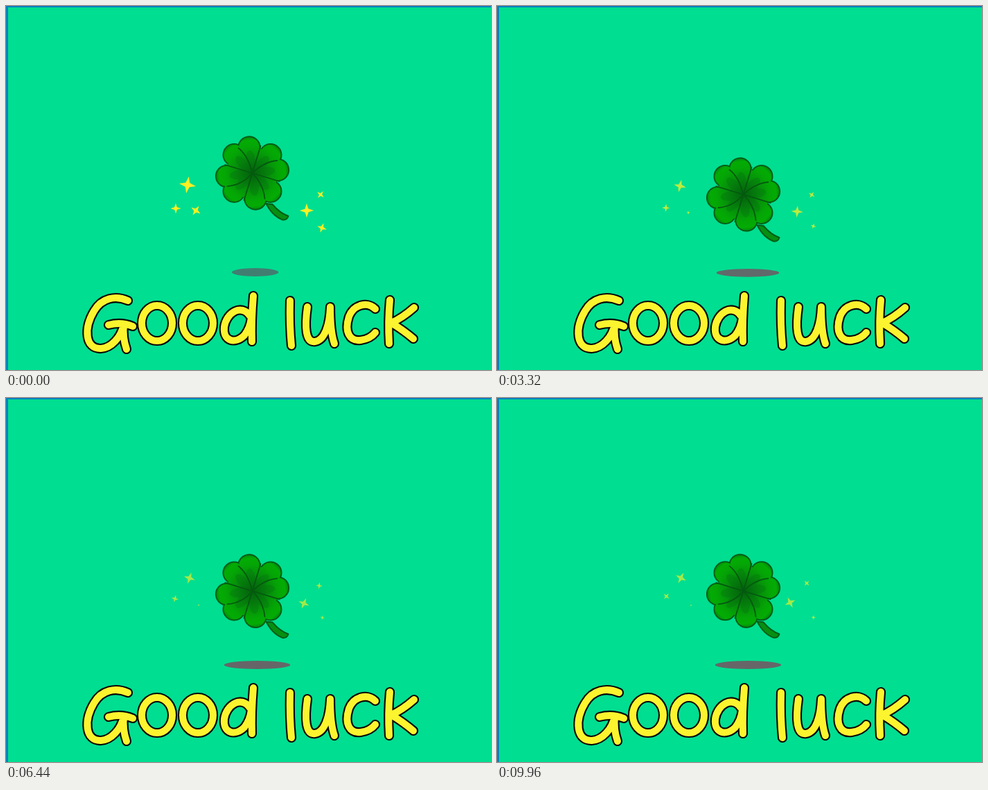
Write an HTML page that moves like this. It is 700x525 px and loops after 10 s.

```html
<!DOCTYPE html>
<html lang="en">
<head>
<meta charset="utf-8">
<title>Good luck</title>
<style>
html, body { margin: 0; width: 100%; height: 100%; overflow: hidden; background: #0a80bd; }
svg { display: block; width: 700px; height: 525px; }
.line { fill: none; stroke-linecap: round; stroke-linejoin: round; }
</style>
</head>
<body>
<svg viewBox="0 0 700 525" role="img" aria-label="Good luck">
  <defs>
    <radialGradient id="leaf" gradientUnits="userSpaceOnUse" cx="0" cy="0" r="54">
      <stop offset="0" stop-color="#04640c"/>
      <stop offset=".4" stop-color="#068a0c"/>
      <stop offset=".72" stop-color="#04a605"/>
      <stop offset=".88" stop-color="#03ac03"/>
      <stop offset="1" stop-color="#067c12"/>
    </radialGradient>
    <g id="lobes"></g>
    <g id="word">
      <path d="M176 425C158 417 138 421 127 440C112 465 114 495 137 494C152 493 166 478 170 459M148 460Q166 455 183 462M170 459Q168 478 174 495"/>
      <ellipse cx="218" cy="457.500" rx="22" ry="25.500"/>
      <ellipse cx="277" cy="457.500" rx="22" ry="25.500"/>
      <path d="M352 447C340 429 318 442 315 463C313 484 331 488 344 475Q352 465 354 450M357 418Q354 455 355 484"/>
      <path d="M410 425Q409 460 412 490"/>
      <path d="M435 434C431 462 432 486 446 484C460 482 467 460 468 434Q468 470 474 487"/>
      <path d="M533 437C522 426 502 430 495 448C488 470 496 484 512 482Q526 480 533 471"/>
      <path d="M554 424Q551 455 553 487M589 435Q572 450 556 457Q574 468 588 480"/>
    </g>
  </defs>
  <rect x="3" y="2" width="697" height="523" fill="#00de91"/>
  <ellipse id="shadow" ry="5.900"/>
  <g id="clover">
    <path d="M20 44Q29 62 44 67.500Q50 68 52 62Q40 58 29 45Z" fill="#078f10" stroke="#055e18" stroke-width="2" stroke-linejoin="round"/>
    <use href="#lobes" fill="none" stroke="#055e18" stroke-width="4"/>
    <use href="#lobes" fill="url(#leaf)"/>
    <circle r="37" fill="url(#leaf)"/>
    <g id="marks" fill="#035a10" opacity=".2"></g>
    <g class="line" stroke="#04590f" stroke-width="1.800">
      <g id="seams"></g>
      <path d="M0 0Q-6-25-20-36M0 0Q18-17 36-18M0 0Q16 16 18 37M0 0Q-14 17-36 19"/>
    </g>
  </g>
  <g id="stars" fill="#fcef22"></g>
  <use href="#word" class="line" stroke="#050505" stroke-width="14.200"/>
  <use href="#word" class="line" stroke="#fbf42e" stroke-width="10"/>
</svg>
<script>
const LOOP = 10000, START = 880, DROP = 37.5;
const $ = id => document.getElementById(id);
const mix = (a, b, p) => a + (b - a) * p;

function set(el, attrs) {
  for (const name in attrs) el.setAttribute(name, attrs[name]);
}
function add(parent, tag, attrs) {
  const el = document.createElementNS('http://www.w3.org/2000/svg', tag);
  set(el, attrs);
  return parent.appendChild(el);
}

// Four leaves, each with two lobes and a seam beside it.
for (let turn = 0; turn < 360; turn += 90) {
  for (const angle of [turn + 45, turn + 83]) {
    const transform = `rotate(${angle})`;
    add($('lobes'), 'circle', { cx: 37.2, r: 14.7, transform });
    add($('marks'), 'ellipse', { cx: 17, rx: 16, ry: 7, transform });
    add($('marks'), 'ellipse', { cx: 9, rx: 8, ry: 4.5, transform });
  }
  add($('seams'), 'path', { d: 'M0 0H41', transform: `rotate(${turn + 17})` });
}

// Turning points of the bob: top, bottom, top, ...
const turns = [890, 2830, 4620, 6410, 8150, 10040];
function bob(t) {
  if (t < turns[0]) return 0;
  const i = turns.findIndex(end => t < end) - 1;
  const part = (t - turns[i]) / (turns[i + 1] - turns[i]);
  const eased = (1 - Math.cos(Math.PI * part)) / 2;
  return i % 2 ? 1 - eased : eased;
}

// pos is [x, y, angle]; drift is added over the loop, sway follows the bob.
const stars = [
  { r: 12.2, shrink: 3.8, pos: [262, 258, 9], drift: [1, -.5, 15], sway: [2.5, 2, 4] },
  { r: 7.6, shrink: 2.3, pos: [245, 292, 0], drift: [1, -5.5, 42], sway: [-1.5, -.5, 0] },
  { r: 8, shrink: 6.3, pos: [274, 295, 35], drift: [9, 1, 75], sway: [-3, 3, 0], power: .5 },
  { r: 6.2, shrink: 1.4, pos: [454, 272, 40], drift: [-8, -6, -85], sway: [1, 1, 0] },
  { r: 10.2, shrink: 2, pos: [434, 295, 0], drift: [-11, -2, 65], sway: [0, 2, 0] },
  { r: 7.2, shrink: 3.8, pos: [456, 320, 20], drift: [0, -.5, -10], sway: [.7, -3, 0] }
];
const spark = 'M0-1L.22-.26L1 0L.26 .22L0 1L-.22 .26L-1 0L-.26-.22Z';
for (const star of stars) star.el = add($('stars'), 'path', { d: spark });

function drawStar({ el, r, shrink, pos, drift, sway, power = 2 }, t, low) {
  const part = Math.max(0, (t - START) / (LOOP - START)) ** power;
  const [x, y, angle] = pos.map((v, i) => v + drift[i] * part + sway[i] * low);
  set(el, {
    transform: `translate(${x} ${y}) rotate(${angle}) scale(${r - shrink * low})`,
    opacity: 1 - .35 * Math.max(0, low - .4) / .6
  });
}

function draw(now) {
  const t = Math.floor((now % LOOP) / 40) * 40;
  const low = bob(t);
  set($('clover'), { transform: `translate(355.500 ${241 + DROP * low})` });
  set($('shadow'), {
    cx: mix(359.6, 362.5, low), cy: mix(384, 385, low), rx: mix(33.7, 47.8, low),
    fill: `rgb(${mix(65, 102, low)}, ${mix(126, 102, low)}, ${mix(114, 104, low)})`
  });
  for (const star of stars) drawStar(star, t, low);
}

const begin = performance.now();
function tick() {
  draw(performance.now() - begin);
  requestAnimationFrame(tick);
}
tick();
</script>
</body>
</html>
```
